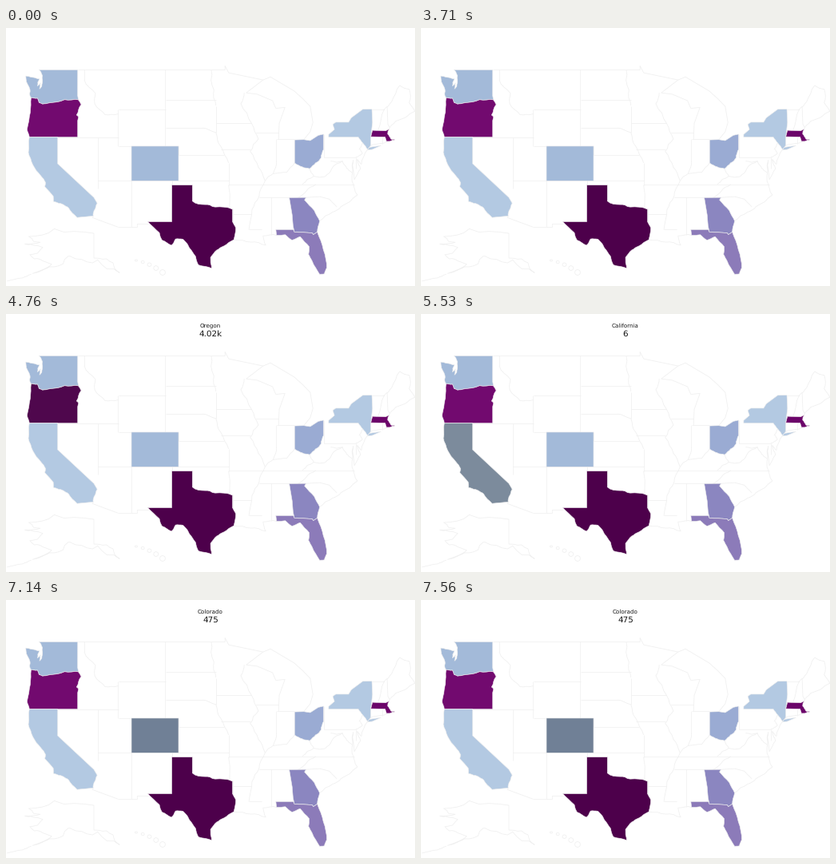
These frames come from a looping animation (512x323 px, 8000 ms). A matplotlib script:

```python
import numpy as np
import matplotlib.pyplot as plt
from matplotlib.animation import FuncAnimation
from matplotlib.collections import LineCollection
from matplotlib.colors import to_rgb
from matplotlib.patches import Polygon

W, H, DPI = 512, 323, 100
LOOP, STEP = 8000, 20
PX = 72 / DPI
SCALE = 8.43  # pixels per degree of longitude
rng = np.random.default_rng(7)


def mercator(lon, lat):
    m = np.degrees(np.log(np.tan(np.radians(45 + lat / 2))))
    return 157 + (lon + 109.05) * SCALE, 52.3 + (56.37 - m) * SCALE


def alaska(lon, lat):
    return 110 + (lon + 141) * 3.2, 288 - (lat - 60.3) * 3.33


def line(*lonlat, project=mercator):
    """Straight border through lon, lat pairs, in pixels."""
    lon, lat = np.array(lonlat, float).reshape(-1, 2).T
    return np.column_stack(project(lon, lat))


def coast(*lonlat, project=mercator, rough=0.1):
    """Natural border: key points roughened by midpoint displacement."""
    p = line(*lonlat, project=project)
    for _ in range(2):
        d = np.diff(p, axis=0)
        shift = rng.uniform(-rough, rough, (len(d), 1))
        mid = p[:-1] + d / 2 + shift * d[:, ::-1] * [1, -1]
        p = np.vstack([np.insert(p[1:], 0, p[0], axis=0)[:1],
                       np.stack([mid, p[1:]], axis=1).reshape(-1, 2)])
    return p


def join(*parts):
    return np.vstack(parts)


# Borders shared by two coloured states
columbia = coast(-116.92, 45.99, -118.98, 46, -121.2, 45.67, -122.25, 45.55,
                 -122.77, 45.7, -123, 46.15, -123.95, 46.22, rough=0.06)
st_marys = coast(-84.86, 30.7, -82.2, 30.57, -82.05, 30.36, -81.45, 30.7,
                 rough=0.03)

# outline and fill
STATES = {
    "Washington": (join(
        line(-122.76, 49, -117.03, 49, -117.04, 46.43), columbia,
        coast(-124.05, 46.3, -124.1, 47, -124.7, 48.1, -124.72, 48.39,
              -123.1, 48.15, -122.7, 48.1, -123, 47.4, -122.55, 47.7,
              -122.7, 47.1, -122.35, 47.4, -122.25, 48, -122.5, 48.8)),
        "#a3bad9"),
    "Oregon": (join(
        columbia,
        coast(-123.95, 46.2, -124.06, 44.7, -124.55, 42.84, -124.2, 42,
              rough=0.04),
        line(-117.03, 42, -117.03, 43.8),
        coast(-116.9, 44.2, -117.2, 44.4, -116.5, 45.5, -116.92, 45.99)),
        "#720a6f"),
    "California": (join(
        line(-124.2, 42, -120, 42, -120, 39, -114.63, 35),
        coast(-114.13, 34.3, -114.6, 33.4, -114.72, 32.72),
        coast(-117.12, 32.53, -118.4, 33.75, -119.2, 34.15, -120.6, 34.5,
              -120.65, 35.15, -121.9, 36.3, -121.8, 36.8, -122.5, 37.6,
              -123.7, 38.9, -124.35, 40.3, -124.2, 42, rough=0.06)),
        "#b3c9e2"),
    "Colorado": (line(-109.05, 41, -102.05, 41, -102.05, 37, -109.05, 37),
                 "#a3bad9"),
    "Texas": (join(
        line(-106.62, 32, -103.06, 32, -103.04, 36.5, -100, 36.5),
        coast(-100, 34.56, -98.1, 34.13, -96.6, 33.83, -94.04, 33.55),
        line(-94.04, 33.55, -94.04, 32),
        coast(-94.04, 32, -93.55, 31.2, -93.85, 29.7, -95.3, 28.9,
              -96.4, 28.35, -97.3, 27.4, -97.15, 25.96, -99.1, 26.4,
              -99.5, 27.5, -100.7, 29.1, -101.4, 29.77, -102.5, 29.8,
              -103.1, 28.98, -104.5, 29.65, -104.9, 30.6, -106.62, 32,
              rough=0.06)),
        "#4d004b"),
    "Ohio": (join(
        line(-84.82, 41.7, -83.45, 41.73, -82.5, 41.62, -81.3, 42.2,
             -80.52, 42.33),
        coast(-80.52, 40.64, -80.87, 39.7, -81.7, 39.1, -82.6, 38.42,
              -83.7, 38.65, -84.82, 39.1)),
        "#9aabd3"),
    "New York": (join(
        line(-79.76, 42.3, -79.76, 42, -75.35, 42),
        coast(-75.35, 42, -74.7, 41.36, -74, 40.65, -73.5, 41.1, rough=0.05),
        line(-73.5, 42.05, -73.25, 43.6, -73.34, 45.01, -74.7, 45,
             -76.4, 44.1, -76.8, 43.63, -78.7, 43.63, -79.15, 43.4,
             -78.9, 42.85)),
        "#b3c9e2"),
    "Long Island": (line(-74.03, 40.58, -73.7, 40.87, -72, 41.06,
                         -73.3, 40.63), "#b3c9e2"),
    "Massachusetts": (join(
        line(-73.5, 42.05, -73.26, 42.75, -71.3, 42.7),
        coast(-70.8, 42.88, -71, 42.35, -70.5, 41.78, -70.05, 41.78,
              -69.95, 41.7, -70.65, 41.55, -71.15, 41.5),
        line(-71.38, 42.02)),
        "#6c056a"),
    "Georgia": (join(
        line(-85.61, 34.98, -83.11, 35),
        coast(-83.35, 34.7, -81.9, 33.4, -81.1, 32.1, -81.45, 30.7,
              rough=0.04),
        st_marys[::-1], line(-85.05, 31.5, -85.18, 32.85)),
        "#8b86c0"),
    "Florida": (join(
        line(-87.6, 31, -85, 31), st_marys,
        coast(-81.45, 30.7, -80.55, 28.4, -80.05, 26, -80.4, 25.2,
              -81.1, 25.15, -82.2, 26.9, -82.75, 27.8, -82.65, 28.8,
              -84, 30.1, -85.2, 29.65, -86.2, 30.35, -87.5, 30.28,
              rough=0.05)),
        "#8c7bb9"),
}

# Surveyed borders: latitude with its longitudes, then the other way round
PARALLELS = [
    (49, -117, -95.2), (45.94, -104, -96.5), (45, -111, -104),
    (45, -73.3, -71.5), (43.5, -96.5, -91.2), (43, -104, -98.5),
    (42.5, -90.6, -87.2), (42, -120, -111), (41.76, -87.5, -84.8),
    (41, -111, -102), (40.6, -95.8, -91.4), (40, -102, -95.3),
    (39.72, -80.5, -75.8), (37, -114, -94.6), (36.53, -94.6, -75.9),
    (35, -90.1, -83.1), (33, -94, -91.2), (31.33, -111.1, -108.2),
    (31, -91.6, -89.7),
]
MERIDIANS = [
    (-116.05, 48, 49), (-114.04, 36.1, 42), (-111.05, 41, 45),
    (-109.05, 31.33, 37), (-104.05, 41, 49), (-103.04, 32, 37),
    (-102.05, 40, 41), (-96.45, 42.5, 45.3), (-94.62, 36.5, 39.1),
    (-94.04, 32, 33.6), (-88.3, 30.3, 35), (-87.53, 39.3, 41.76),
    (-80.52, 39.72, 42.3), (-75.75, 38.45, 39.72), (-71.85, 41.3, 42),
]
survey = ([line(a, lat, b, lat) for lat, a, b in PARALLELS]
          + [line(lon, a, lon, b) for lon, a, b in MERIDIANS])

rivers = [
    coast(-116.05, 48, -114.4, 46.65, -114.5, 45.6, -113, 44.45,
          -111.05, 44.5),
    coast(-97.2, 49, -96.8, 47, -96.5, 45.4),
    coast(-98.5, 43, -96.5, 42.5, -95.8, 41, -94.62, 39.1),
    coast(-92.3, 46.7, -92.8, 45.6, -91.2, 43.5, -90.2, 41.8, -91.4, 40.4,
          -90.2, 38.6, -89.2, 37, -90.1, 35.1, -91.15, 33.5, -91.6, 31),
    coast(-84.82, 39.1, -86, 38, -88, 37.85, -89.2, 37),
    coast(-87.53, 39.3, -88, 37.85),
    coast(-81.68, 36.59, -83.1, 35.75, -84.3, 35),
    line(-83.11, 35, -81.05, 35.1, -79.67, 34.8, -78.55, 33.86),
    coast(-83.67, 36.6, -81.97, 37.54, -80.3, 37.5, -79.3, 38.42,
          -77.7, 39.3),
    coast(-81.97, 37.54, -82.6, 38.42),
    coast(-79.48, 39.3, -77.7, 39.3, -77.1, 38.5, -76.3, 37.95),
    coast(-75.79, 39.72, -74.75, 40.2, -75.2, 40.7, -74.7, 41.36),
    coast(-71.5, 45.01, -72.45, 42.73),
    line(-94.62, 36.5, -94.43, 35.4, -94.48, 33.64),
]

shores = [
    line(-114.72, 32.72, -114.8, 32.5, -111.07, 31.33),
    line(-108.2, 31.33, -108.2, 31.78, -106.6, 31.78),
    line(-95.15, 49, -95.15, 49.38, -94.6, 48.7, -89.5, 48, -88.4, 48.3,
         -84.9, 46.9, -83.6, 46.1, -82.5, 45.3, -82.1, 43.6, -82.5, 42.6,
         -83.45, 41.73),
    line(-89.5, 48, -92, 46.7, -90.4, 46.57, -88.1, 45.9, -87.6, 45.1,
         -86.25, 45.2, -87.1, 43.5, -87.2, 41.76),
    coast(-74, 40.6, -74.9, 38.95, -75.5, 39.5, -75.05, 38.4, -75.95, 37.15,
          -76.1, 39.4, -76.3, 37, -75.5, 35.3, -77.9, 33.9, -79.2, 33.2,
          -81.1, 32.1),
    coast(-93.85, 29.7, -91.3, 29.4, -89.1, 29, -89.5, 30.2, -87.5, 30.28),
    coast(-71.5, 45.01, -70.4, 45.8, -69.2, 47.45, -67.8, 47.07, -67.8, 45.7,
          -66.97, 44.8, -69.8, 43.75, -70.8, 42.88),
    line(-71.08, 45.3, -70.97, 43.4, -70.7, 43.07),
    coast(-73.65, 41, -71.85, 41.32, -71.15, 41.5),
    coast(-141, 69.6, -156.5, 71.3, -166.5, 68.4, -162, 66.2, -168, 65.6,
          -161, 64.3, -166, 61.6, -162, 59.8, -157.5, 58, -165, 54.5,
          -156.5, 57, -151, 61, -148, 60, -139.5, 59.6, -131, 54.8,
          -133.5, 58.5, -139, 60.2, project=alaska, rough=0.2),
    line(-139, 60.2, -141, 60.3, -141, 69.6, project=alaska),
    coast(-165.5, 54.2, -169, 52.8, -175, 51.6, project=alaska),
]

# Island chain growing towards the south-east
turn = np.linspace(0, 2 * np.pi, 9)
islands = [np.column_stack([163 + 11 * k + (1.5 + 0.7 * k) * np.cos(turn),
                            291 + k * (2 + k) + (1.2 + 0.8 * k) * np.sin(turn)])
           for k in np.linspace(0, 3, 5)]

# start time, state under the pointer, value shown
HOVERS = [
    (0, None, ""),
    (3850, "Washington", "468"),
    (4760, "Oregon", "4.02k"),
    (5530, "California", "6"),
    (7000, None, ""),
    (7140, "Colorado", "475"),
    (7280, None, ""),
    (7560, "Colorado", "475"),
]

plt.rcParams.update({"font.family": "DejaVu Sans", "text.hinting": "none"})
fig = plt.figure(figsize=(W / DPI, H / DPI), dpi=DPI, facecolor="white")
ax = fig.add_axes([0, 0, 1, 1])
ax.set(xlim=(0, W), ylim=(H, 0))
ax.axis("off")

ax.add_collection(LineCollection(survey + rivers + shores + islands,
                                 colors="#f0f0f0", linewidths=0.8 * PX))
shapes = {
    state: ax.add_patch(Polygon(outline, facecolor=fill, edgecolor="#eeeeee",
                                linewidth=0.6 * PX, joinstyle="round",
                                snap=False, zorder=3))
    for state, (outline, fill) in STATES.items()
}


def label(y, size):
    return ax.text(256, y, "", size=size * PX, color="#151515",
                   ha="center", va="baseline")


title, value = label(17, 7.2), label(27.6, 10.4)


def draw(i):
    now = i * STEP + STEP / 2
    _, hovered, amount = [h for h in HOVERS if h[0] <= now][-1]
    for state, shape in shapes.items():
        light = 0.69 if state == hovered else 1
        shape.set_facecolor(light * np.array(to_rgb(STATES[state][1])))
    title.set_text(hovered or "")
    value.set_text(amount)
    return [*shapes.values(), title, value]


anim = FuncAnimation(fig, draw, frames=LOOP // STEP, interval=STEP,
                     repeat=True, repeat_delay=0)
plt.show()
```
